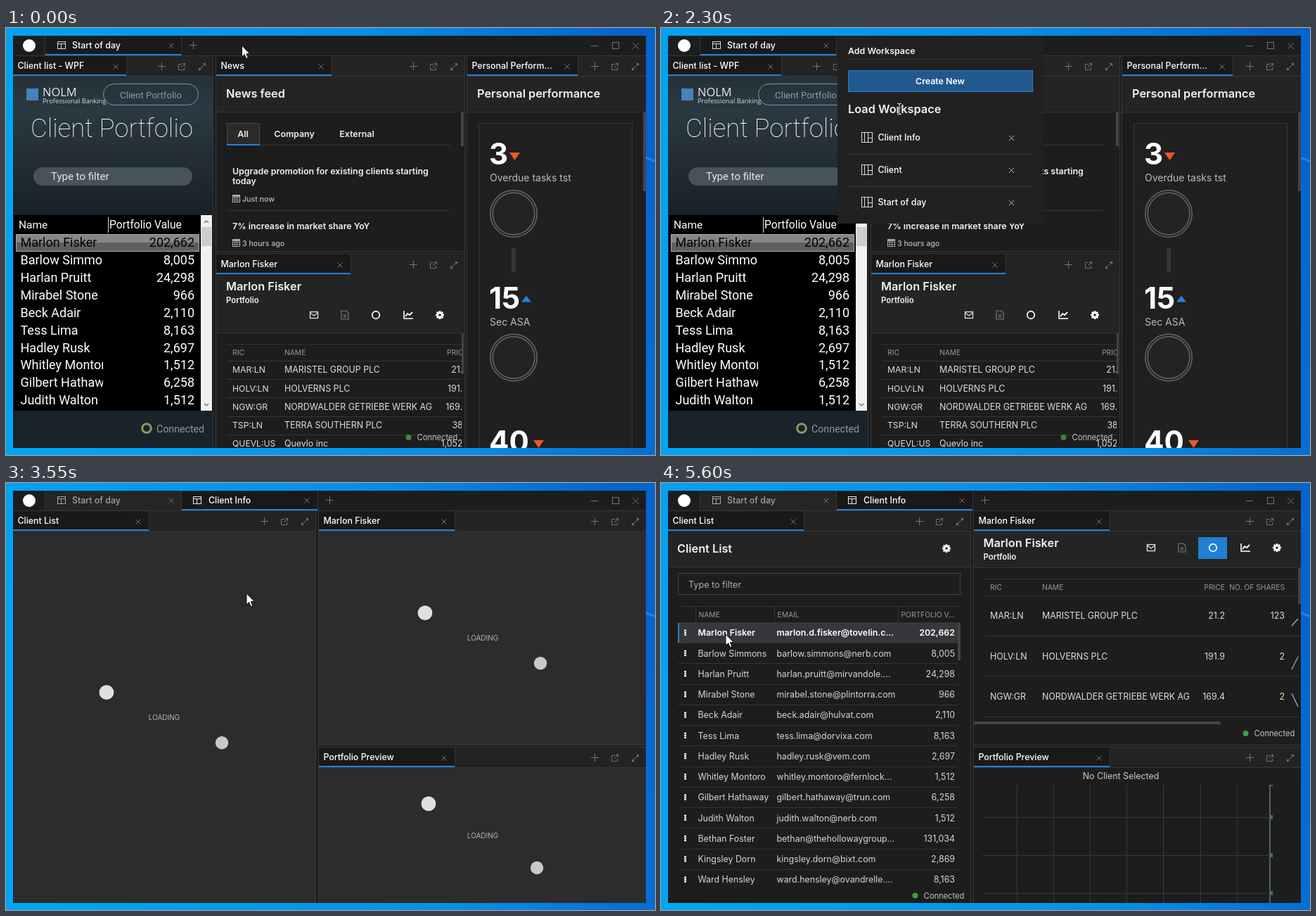
An HTML page with a canvas for the animation above (6.79 s loop, 923x607 px).

```html
<!DOCTYPE html>
<html lang="en">
<head>
<meta charset="utf-8">
<title>Workspace switch</title>
<style>
html, body { margin: 0; width: 100%; height: 100%; overflow: hidden; background: #0a86e4 }
canvas { display: block }
</style>
</head>
<body>
<canvas id="stage" width="923" height="607"></canvas>
<script>
const g = document.getElementById('stage').getContext('2d');
const LOOP = 6790, BLUE = '#2381d6', LINE = '#363636', DIM = '#747474', WHITE = '#fff';
const SANS = 'Inter, "Open Sans", sans-serif', ROBOTO = 'Roboto, sans-serif';

const clients = [
  ['Marlon Fisker', '202,662', 'marlon.d.fisker@tovelin.com'],
  ['Barlow Simmons', '8,005', 'barlow.simmons@nerb.com'],
  ['Harlan Pruitt', '24,298', 'harlan.pruitt@mirvandole.com'],
  ['Mirabel Stone', '966', 'mirabel.stone@plintorra.com'],
  ['Beck Adair', '2,110', 'beck.adair@hulvat.com'],
  ['Tess Lima', '8,163', 'tess.lima@dorvixa.com'],
  ['Hadley Rusk', '2,697', 'hadley.rusk@vem.com'],
  ['Whitley Montoro', '1,512', 'whitley.montoro@fernlocke.com'],
  ['Gilbert Hathaway', '6,258', 'gilbert.hathaway@trun.com'],
  ['Judith Walton', '1,512', 'judith.walton@nerb.com'],
  ['Bethan Foster', '131,034', 'bethan@thehollowaygroup.com'],
  ['Kingsley Dorn', '2,869', 'kingsley.dorn@bixt.com'],
  ['Ward Hensley', '8,163', 'ward.hensley@ovandrelle.com']
];
const client = clients[0][0];
const stocks = [
  ['MAR:LN', 'MARISTEL GROUP PLC', '21.2', '123'],
  ['HOLV:LN', 'HOLVERNS PLC', '191.9', '2'],
  ['NGW:GR', 'NORDWALDER GETRIEBE WERK AG', '169.4', '2'],
  ['TSP:LN', 'TERRA SOUTHERN PLC', '38.1'],
  ['QUEVL:US', 'Quevlo inc', '1,052.1']
];

// Drawing helpers
function rect(x, y, w, h, c) { g.fillStyle = c; g.fillRect(x, y, w, h); }
function frame(x, y, w, h, c, lw = 1) { g.strokeStyle = c; g.lineWidth = lw; g.strokeRect(x + .5, y + .5, w - 1, h - 1); }
function trace(p) {
  g.beginPath();
  for (let i = 0; i < p.length; i += 2) g.lineTo(p[i], p[i + 1]);
}
function line(c, lw, ...p) { trace(p); g.strokeStyle = c; g.lineWidth = lw; g.stroke(); }
function poly(c, ...p) { trace(p); g.fillStyle = c; g.fill(); }
function disc(x, y, r, c) { g.beginPath(); g.arc(x, y, r, 0, 7); g.fillStyle = c; g.fill(); }
function ring(x, y, r, c, lw) { g.beginPath(); g.arc(x, y, r, 0, 7); g.strokeStyle = c; g.lineWidth = lw; g.stroke(); }
function pill(x, y, w, h) { g.beginPath(); g.roundRect(x, y, w, h, h / 2); }
// y is the middle of the capitals
function text(s, x, y, size = 12.4, c = '#f2f2f2', weight = 600, align = 'left', font = SANS, width) {
  g.font = `${weight} ${size}px ${font}`;
  if (width && g.measureText(s).width > width) {
    while (g.measureText(s + '...').width > width) s = s.slice(0, -1);
    s += '...';
  }
  g.fillStyle = c; g.textAlign = align;
  g.fillText(s, x, y + size * .36);
}
function clip(x, y, w, h, draw) {
  g.save(); g.beginPath(); g.rect(x, y, w, h); g.clip(); draw(); g.restore();
}
function mix(a, b, k) {
  k = Math.min(1, Math.max(0, k));
  return `rgb(${a.map((v, i) => v + (b[i] - v) * k)})`;
}

// Icons
function cross(x, y, r, c = DIM) { line(c, 1, x - r, y - r, x + r, y + r); line(c, 1, x - r, y + r, x + r, y - r); }
function plus(x, y, c = DIM) { line(c, 1, x - 5, y + .5, x + 6, y + .5); line(c, 1, x + .5, y - 5, x + .5, y + 6); }
function tabIcon(x, y, c) {
  frame(x, y, 12, 11, c);
  line(c, 1, x, y + 3.5, x + 12, y + 3.5); line(c, 1, x + 5.5, y + 3, x + 5.5, y + 11);
}
function gridIcon(x, y) {
  frame(x, y, 16, 15, '#ddd');
  line('#ddd', 1, x + 4.5, y, x + 4.5, y + 15); line('#ddd', 1, x + 9.5, y, x + 9.5, y + 15);
  line('#ddd', 1, x + 9, y + 8.5, x + 16, y + 8.5);
}
function tools(right, y) {
  plus(right - 73, y - 1);
  const x = right - 44, e = right - 15;
  line(DIM, 1, x, y - 3.5, x - 4.5, y - 3.5, x - 4.5, y + 4.5, x + 3.5, y + 4.5, x + 3.5, y + 1);
  line(DIM, 1, x - 1, y + 1, x + 5, y - 5); line(DIM, 1, x + 1, y - 4.5, x + 4.5, y - 4.5, x + 4.5, y - 1);
  line(DIM, 1, e - 4, y + 4, e + 4, y - 4);
  poly(DIM, e + 5, y - 5, e + 5, y - 1, e + 1, y - 5);
  poly(DIM, e - 5, y + 5, e - 5, y + 1, e - 1, y + 5);
}
function gear(x, y) {
  for (let a = 0; a < 8; a++) {
    const u = Math.cos(a * Math.PI / 4), v = Math.sin(a * Math.PI / 4);
    line(WHITE, 2.6, x + u * 3, y + v * 3, x + u * 6, y + v * 6);
  }
  ring(x, y, 3.2, WHITE, 2.8);
}
function actions(x, y, gap, mail) {
  frame(x - 6, y - 5, 12, 10, mail, 1.3);
  line(mail, 1.3, x - 5, y - 3, x, y + 1, x + 5, y - 3);
  const f = x + gap;
  line('#777', 1.2, f + 2, y - 6, f - 5, y - 6, f - 5, y + 6, f + 5, y + 6, f + 5, y - 3, f + 2, y - 6);
  line('#777', 1.2, f - 2, y - 1, f + 2, y + 4); line('#777', 1.2, f + 2, y - 1, f - 2, y + 4);
  ring(x + gap * 2, y, 5.3, WHITE, 1.7);
  const c = x + gap * 3 + 2;
  line(WHITE, 1.6, c - 6, y - 6, c - 6, y + 5, c + 7, y + 5);
  line(WHITE, 1.8, c - 4, y + 2, c - 1, y - 2, c + 2, y, c + 6, y - 4);
  gear(x + gap * 4 + 3, y);
}
function calendar(x, y) {
  frame(x, y, 11, 11, '#aaa'); rect(x, y, 11, 3, '#aaa');
  for (const d of [3.5, 6.5]) { line('#aaa', .8, x + d, y, x + d, y + 11); line('#aaa', .8, x, y + d + 1, x + 11, y + d + 1); }
}
function panel(x, right, y, title, tabEnd) {
  rect(x, y, right - x, 28, '#232323');
  rect(x, y, tabEnd - x, 28, '#191919');
  rect(tabEnd, y, 1, 28, LINE);
  rect(x, y + 28, right - x, 1, LINE);
  rect(x, y + 26, tabEnd - x, 2, BLUE);
  text(title, x + 6.5, y + 14, 12.4, WHITE, 500);
  cross(tabEnd - 15, y + 15, 3.5);
  tools(right, y + 15);
}
function status(x, y, label, c) { disc(x, y, 4, c); text(label, x + 12, y, 11.2, '#c4c4c4', 400); }

function chrome(second) {
  const sky = g.createLinearGradient(0, 350, 923, 150);
  sky.addColorStop(0, '#00a6f3'); sky.addColorStop(.6, '#078fe8'); sky.addColorStop(1, '#0563cc');
  rect(0, 0, 923, 607, sky);
  poly('rgba(60,160,245,.55)', 910, 183, 923, 188, 923, 191, 910, 186);
  rect(10, 11, 900, 586, '#1d1d1d');
  rect(10, 11, 900, 28, '#1c1d1e');
  rect(10, 39, 900, 1, LINE);
  disc(33, 25, 9, WHITE);
  rect(55, 11, 1, 28, LINE);
  rect(56, 11, 193, 28, second ? '#252525' : '#1a1a1a');
  rect(249, 11, 1, 28, LINE);
  tabIcon(73, 19, second ? '#aaa' : '#ddd');
  text('Start of day', 94, 25, 12.4, second ? '#a3a3a3' : WHITE, 500);
  cross(235, 25, 3.5);
  if (second) {
    rect(250, 11, 193, 28, '#191919'); rect(443, 11, 1, 28, LINE);
    tabIcon(266, 19, '#eee');
    text('Client Info', 288, 25, 12.4, WHITE, 500);
    cross(428, 25, 3.5);
  }
  rect(second ? 250 : 56, 37, 193, 2, BLUE);
  plus(second ? 460 : 266, 24);
  line(DIM, 1, 832, 25.5, 842, 25.5); frame(862, 20, 10, 10, DIM); cross(895.5, 25.5, 4.5);
}

function wpfList() {
  const back = g.createLinearGradient(0, 69, 0, 266);
  back.addColorStop(0, '#253139'); back.addColorStop(.25, '#2c3942');
  back.addColorStop(.6, '#222d34'); back.addColorStop(1, '#182127');
  rect(10, 69, 284, 197, back);
  rect(29, 86, 17, 17, '#4682bd');
  text('NOLM', 52, 91, 16.5, '#e8e8e8', 400, 'left', '"Open Sans", sans-serif');
  text('Professional Banking', 52, 104, 9.3, '#d5d9db', 400, 'left', '"Open Sans", sans-serif');
  pill(138.5, 79.5, 135, 30); g.strokeStyle = '#86939a'; g.lineWidth = 1; g.stroke();
  text('Client Portfolio', 206, 95, 13.2, '#8d9aa1', 400, 'center', ROBOTO);
  text('Client Portfolio', 35, 141.5, 36.6, WHITE, 200, 'left', ROBOTO);
  pill(39, 198, 226, 26); g.fillStyle = '#46535c'; g.fill();
  text('Type to filter', 64, 211, 15, '#e4e8ea', 400, 'left', ROBOTO);
  rect(10, 544, 284, 53, '#1a2329');
  rect(11, 266, 283, 278, '#000');
  text('Name', 18, 279, 15.5, WHITE, 400, 'left', ROBOTO);
  rect(145, 269, 1, 22, '#ddd');
  text('Portfolio Value', 147, 279, 15.6, WHITE, 400, 'left', ROBOTO);
  rect(14, 293, 261, 25, '#aaa'); rect(15, 294, 259, 23, '#868686'); rect(15, 305, 259, 12, '#5f5f5f');
  clients.slice(0, 10).forEach(([name, value], i) => {
    const y = 305 + i * 24.85, c = i ? WHITE : '#000';
    clip(14, y - 12, 124, 25, () => text(name, 20.5, y, 18, c, 400, 'left', ROBOTO));
    text(value, 268, y, 18, c, 400, 'right', ROBOTO);
  });
  rect(277, 266, 16, 278, '#f0f0f0'); rect(278, 283, 14, 27, '#cdcdcd');
  line('#666', 1.2, 282, 277, 285, 274, 288, 277); line('#666', 1.2, 282, 534, 285, 537, 288, 534);
  ring(200, 569, 6.3, '#8b9b62', 3);
  text('Connected', 214, 570, 14.2, '#8c999f', 400, 'left', ROBOTO);
}

function news() {
  rect(299, 69, 353, 50, '#242424'); rect(299, 119, 353, 1, LINE);
  text('News feed', 313, 93, 16.3);
  rect(314, 166, 318, 1, LINE);
  rect(314, 135, 47, 31, '#2a2a2a'); frame(314, 135, 47, 32, '#484848'); rect(314, 165, 47, 2, BLUE);
  [['All', 337], ['Company', 410], ['External', 499]].forEach(([s, x]) => text(s, x, 150.5, 12.4, '#eee', 600, 'center'));
  text('Upgrade promotion for existing clients starting', 322, 204);
  text('today', 322, 218);
  calendar(322, 237); text('Just now', 336, 243, 10.6, '#bbb', 500);
  rect(314, 259, 318, 1, LINE);
  text('7% increase in market share YoY', 322, 282);
  calendar(322, 300); text('3 hours ago', 336, 306.5, 10.6, '#bbb', 500);
  rect(647, 120, 4, 48, '#444');
  rect(299, 317, 353, 1, LINE); rect(299, 320, 353, 1, LINE);
}

function holdings() {
  rect(299, 350, 353, 83, '#222524'); rect(299, 433, 353, 1, LINE);
  text(client, 313, 367, 16.3); text('Portfolio', 313, 387, 11.4);
  actions(438, 408, 44, '#ddd');
  rect(314, 449, 334, 1, LINE);
  clip(299, 434, 349, 163, () => {
    text('RIC', 322, 461, 10.3, '#999', 400); text('NAME', 396, 461, 10.3, '#999', 400);
    text('PRICE', 627, 461, 10.3, '#999', 400);
    stocks.forEach(([ric, name, price], i) => {
      const y = 486 + i * 26.2;
      rect(314, Math.round(y - 13), 334, 1, LINE);
      text(ric, 322, y, 12.2, '#ddd', 400); text(name, 396, y, 12.4, '#ddd', 400);
      text(price, 657, y, 12.4, '#ddd', 400, 'right');
    });
  });
  rect(648, 434, 3, 58, '#444');
  status(572.5, 582, 'Connected', '#3f8247');
}

function performanceCards() {
  rect(656, 69, 254, 50, '#242424'); rect(656, 119, 254, 1, LINE);
  text('Personal performance', 670, 93, 16.3);
  clip(656, 120, 254, 477, () => {
    rect(672, 135, 219, 480, '#202020'); frame(672, 135, 219, 480, LINE);
    [['3', 714, 'Overdue tasks tst', 0], ['15', 731, 'Sec ASA', 1], ['40', 748, '', 0]].forEach(([n, x, label, up], i) => {
      const y = 179 + i * 204.5;
      text(n, 687, y, 42, WHITE, 700);
      if (up) poly(BLUE, x + 2, y + 6, x + 16, y + 6, x + 9, y - 3);
      else poly('#f0562a', x + 2, y - 2, x + 17, y - 2, x + 9.5, y + 9);
      text(label, 688, y + 34, 14, '#bababa', 400);
      if (label) { disc(722, y + 85, 33, '#232323'); ring(722, y + 85, 33.2, '#666', 1.5); ring(722, y + 85, 29.8, '#666', 1.5); }
    });
    rect(719, 313, 6, 34, '#353535');
  });
  rect(906, 120, 4, 112, '#444');
}

function menu(t, cursor) {
  rect(251, 11, 292, 267, '#212121');
  text('Add Workspace', 266, 33);
  rect(266, 44, 263, 1, LINE);
  const glow = t < 2160 ? 0 : t <= 2300 ? 1 : 1 - (t - 2300) / 140;
  rect(266, 60, 263, 31, mix([29, 29, 29], [33, 89, 143], glow)); frame(266, 60, 263, 31, '#2b7cc8');
  text('Create New', 397, 76, 12.4, WHITE, 600, 'center');
  text('Load Workspace', 266, 115.5, 16.3);
  ['Client Info', 'Client', 'Start of day'].forEach((s, i) => {
    const y = 156 + i * 46;
    if (i < 2) rect(266, y + 23, 263, 1, LINE);
    if (i < 2 && Math.abs(cursor.y - y) < 23) rect(266, y - 22, 263, 45, '#404040');
    gridIcon(285, y - 8);
    text(s, 308.5, y - .5, 12.4, WHITE, 500);
    cross(498.5, y + .5, 3.5, '#bbb');
  });
}

function loading(x, y, w, h, cx, cy, lead, t) {
  rect(x, y, w, h, '#2c2c2c');
  const a = (203.4 + lead + (t - 3550) * .18) * Math.PI / 180, u = Math.cos(a) * 89.5, v = Math.sin(a) * 89.5;
  disc(cx + u, cy + v, 10.4, '#e0e0e0'); disc(cx - u, cy - v, 9.2, '#c9c9c9');
  text('LOADING', cx, cy, 10, '#b5b5b5', 400, 'center');
}

function clientTable(t) {
  const wide = t >= 4380, picked = t >= 5000;
  const cols = wide ? [49, 161, 337] : [54, 145, 236], pad = 3.5;
  rect(10, 69, 430, 50, '#242424'); rect(10, 119, 430, 1, LINE);
  text('Client List', 23, 93, 16.3); gear(406, 93);
  frame(24, 128, 402, 31, '#454545');
  text('Type to filter', 39, 144, 12.6, '#b0b0b0', 400);
  rect(24, 175, 401, 1, LINE); rect(24, 198, 401, 1, LINE);
  ['NAME', 'EMAIL', wide ? 'PORTFOLIO V...' : 'PORTFOLIO VALUE'].forEach((s, i) => {
    rect(cols[i], 176, 1, 22, LINE);
    text(s, cols[i] + 4.5, 187, 10.3, '#999', 400);
  });
  clip(24, 199, 402, wide ? 374 : 371, () => clients.forEach(([name, value, mail], i) => {
    const y = 213 + i * 29.25, on = !i && picked, c = on ? WHITE : '#d6d6d6', w = on ? 600 : 400;
    if (!i && t >= 4450) rect(24, 199, 398, 28, picked ? '#36373a' : '#2e2e2e');
    if (on) rect(24, 199, 2, 28, BLUE);
    rect(24, Math.round(y + 14), 398, 1, '#333');
    for (const d of [-4, -1, 2]) rect(cols[0] - (wide ? 16 : 18), y + d - .5, 3, 2.4, '#eee');
    text(name, cols[0] + pad, y, 12.4, c, w, 'left', SANS, wide ? 105 : 83);
    text(mail, cols[1] + pad, y, 12.4, c, w, 'left', SANS, wide ? 169 : 85);
    text(value, wide ? 418 : 421.5, y, 12.4, c, w, 'right');
  }));
  rect(422, 199, 4, 53, '#444');
  if (!wide) rect(24, 569, 398, 3, '#4a4a4a');
  if (wide) status(361.5, 586.5, 'Connected', '#439a46');
  else status(348, 586.5, 'Disconnected', '#f0532a');
}

function portfolio(t) {
  const chosen = t >= 5130;
  rect(445, 69, 465, 51, '#222524'); rect(445, 120, 465, 1, LINE);
  text(chosen ? client : 'No client selected', 458.5, 85, 16.3); text('Portfolio', 458.5, 105, 11.4);
  rect(764, 77, 41, 31, mix([33, 89, 143], [32, 127, 214], (t - 4380) / 300)); frame(764, 77, 41, 31, '#2a80cc');
  actions(697, 92, 44, chosen ? '#e5e5e5' : '#777');
  status(831.5, 356, 'Connected', '#439a46');
  if (!chosen) return;
  const head = (s, x, align) => text(s, x, 148, 10.3, '#999', 400, align);
  rect(460, 136, 448, 1, LINE); rect(460, 160, 448, 1, LINE);
  head('RIC', 468); head('NAME', 542); head('PRICE', 802, 'right'); head('NO. OF SHARES', 887, 'right');
  rect(906, 121, 4, 51, '#444'); rect(445, 339, 351, 4, '#444');
  if (t < 5530) return;
  stocks.slice(0, 3).forEach(([ric, name, price, shares], i) => {
    const y = 189 + i * 57.4;
    rect(460, Math.round(y + 28), 448, 1, LINE);
    text(ric, 468, y, 12.4, '#ddd', 400); text(name, 542, y, 12.4, '#ddd', 400);
    text(price, 802, y, 12.4, '#ddd', 400, 'right'); text(shares, 887, y, 12.4, '#ddd', 400, 'right');
    const [a, b] = [[203, 193], [265, 247], [299, 318]][i];
    if (t >= 5600) line('#86b4e6', 1.3, 897, a, 906, b);
  });
}

function preview() {
  text('No Client Selected', 654, 416.5, 12.4, '#ccc', 400, 'center');
  for (let i = 0; i < 7; i++) rect(Math.round(505.5 + i * 52.2), 429, 1, 168, '#303e3c');
  rect(865, 429, 2, 168, '#4c6466'); rect(865, 429, 5, 2, '#4c6466');
  for (const y of [475, 529, 583]) { rect(457, y, 408, 1, '#303e3c'); rect(865, y - 3, 5, 6, '#4c6466'); }
}

function dayScene(t, cursor) {
  chrome(false);
  panel(10, 294, 40, 'Client list - WPF', 171);
  wpfList();
  rect(294, 40, 1, 557, LINE); rect(298, 40, 1, 557, LINE);
  panel(299, 652, 40, 'News', 463);
  news();
  panel(299, 652, 322, client, 490);
  holdings();
  rect(652, 40, 1, 557, LINE); rect(655, 40, 1, 557, LINE);
  panel(656, 910, 40, 'Personal Perform...', 813);
  performanceCards();
  if (t >= 1700) menu(t, cursor);
}

function infoScene(t) {
  chrome(true);
  panel(10, 440, 40, 'Client List', 203);
  panel(445, 910, 40, t >= 3760 && t < 5130 ? 'Client Portfolio' : client, 638);
  t < 3970 ? loading(10, 69, 430, 528, 225, 333.5, 0, t) : clientTable(t);
  t < 3760 ? loading(445, 69, 465, 303, 678, 220.5, 0, t) : portfolio(t);
  rect(440, 40, 1, 557, LINE); rect(444, 40, 1, 557, LINE);
  rect(445, 372, 465, 1, LINE); rect(445, 375, 465, 1, LINE);
  panel(445, 910, 376, 'Portfolio Preview', 638);
  t < 3900 ? loading(445, 405, 465, 192, 678, 501.5, 7, t) : preview();
}

// Pointer: time, x, y
const path = [
  [0, 335.5, 25], [390, 335.5, 25], [1020, 271, 28], [1230, 267, 25], [2030, 267, 25],
  [2300, 339, 115], [2510, 347, 238], [2650, 344, 158], [3070, 344, 158], [3140, 342, 157],
  [3620, 342, 157], [4310, 211, 198], [4730, 92, 215], [LOOP, 92, 215]
];
function pointer(t) {
  const i = path.findIndex(p => p[0] > t), [t0, x0, y0] = path[i - 1], [t1, x1, y1] = path[i];
  const k = (t - t0) / (t1 - t0), e = k * k * (3 - 2 * k);
  return { x: x0 + (x1 - x0) * e, y: y0 + (y1 - y0) * e };
}
function drawPointer(t, { x, y }) {
  if (t >= 5130 && t < 5330) return;
  g.save(); g.translate(x, y); g.lineJoin = 'round';
  if (t >= 1700 && t < 3140 && y > 98) {
    for (const [c, w] of [['#222', 2.4], ['#eee', 1]]) {
      line(c, w, -3, -8, 0, -7, 3, -8); line(c, w, 0, -7, 0, 7); line(c, w, -3, 8, 0, 7, 3, 8);
    }
  } else if (t < 1700 && x < 283 || t >= 1700 && t < 3140 && y > 60 || t >= 4170 && t < 5130) {
    const p = [-2, 1, 0, -.5, 2, 1, 2, 7, 5, 7, 8, 8, 10, 10, 10, 15, 8, 18, 8, 21, -1, 21, -2, 18, -6, 13, -6, 10, -4, 10, -2, 12, -2, 1];
    poly(WHITE, ...p); line('#111', 1, ...p);
    line('#111', 1, 2, 7, 2, 11); line('#111', 1, 5, 8, 5, 11); line('#111', 1, 8, 9, 8, 12);
  } else {
    const p = [0, 0, 0, 16, 3.7, 12.5, 6.2, 18.5, 8.8, 17.4, 6.3, 11.6, 11, 11.3, 0, 0];
    poly(WHITE, ...p); line('#111', 1, ...p);
  }
  g.restore();
}

function draw(now) {
  const t = now % LOOP, p = pointer(t);
  t < 3140 ? dayScene(t, p) : infoScene(t);
  if ([[1560, 1700], [2930, 3070], [5000, 5130]].some(([a, b]) => t >= a && t < b)) disc(p.x - .5, p.y, 11.5, 'rgba(196,184,20,.78)');
  if (t >= 1560 && t < 1700) plus(266, 24, '#ddd');
  drawPointer(t, p);
  requestAnimationFrame(draw);
}
requestAnimationFrame(draw);
</script>
</body>
</html>
```
